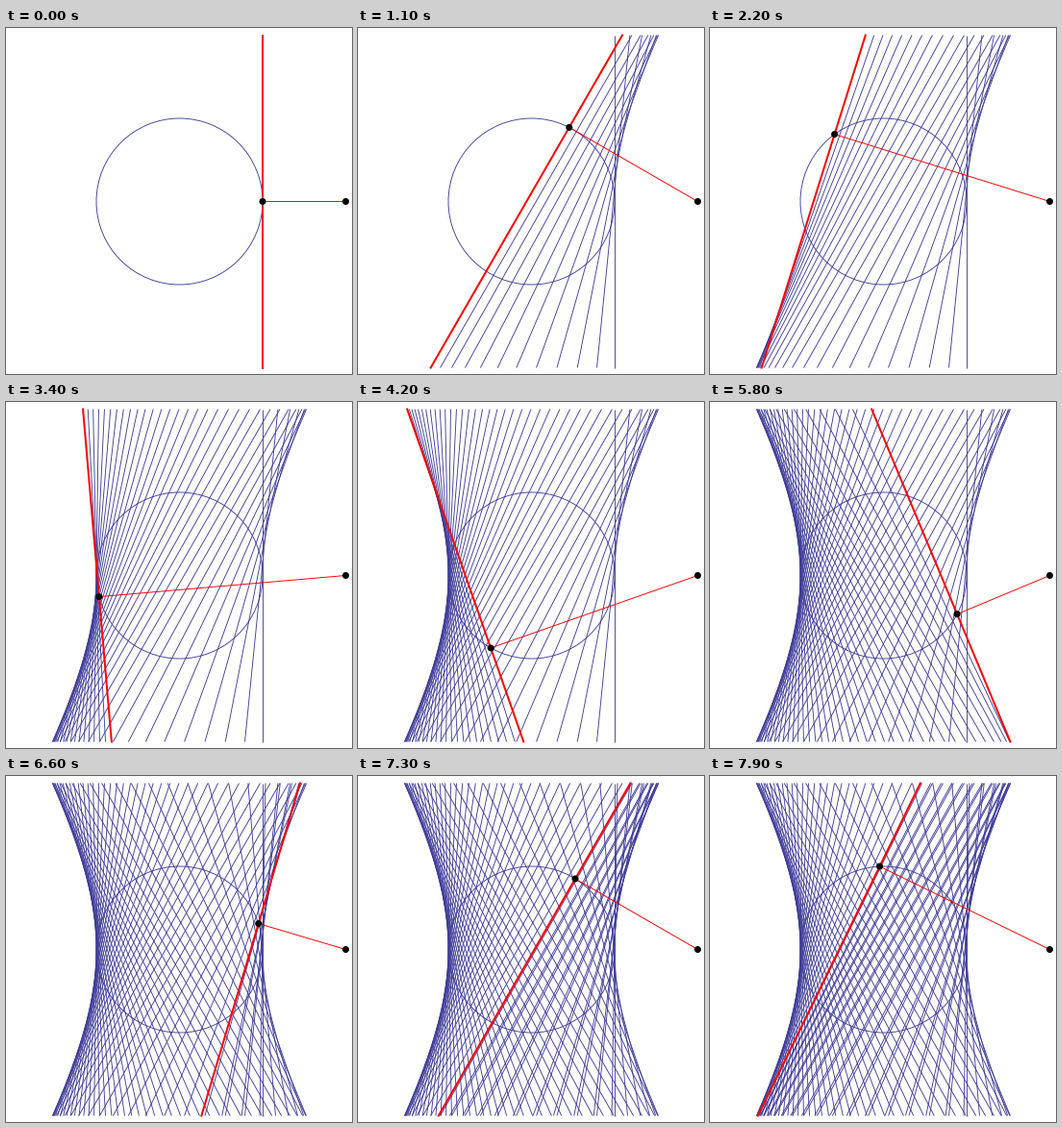
Write a matplotlib script that moves like this. It is 360x360 px and loops after 8000 ms.

```python
import numpy as np
import matplotlib.pyplot as plt
from matplotlib.animation import FuncAnimation
from matplotlib.collections import LineCollection
from matplotlib.patches import Circle

SIZE, DPI = 360, 72          # at 72 dpi one point is one pixel
FRAMES, INTERVAL = 80, 100
STEP = 0.1                   # radians per frame
CENTER, R = 180.5, 86.5
BLUE, RED = "#3f3d99", "#ff0000"


def to_px(x, y):
    """Unit-circle coordinates to stage pixels, y pointing down."""
    return CENTER + R * x, CENTER - R * y


def pedal_line(a):
    """Line through the circle point, perpendicular to its ray to the focus (2, 0)."""
    c, s = np.cos(a), np.sin(a)
    return [to_px(c + s * (y - s) / (2 - c), y) for y in (2, -2)]


fig = plt.figure(figsize=(SIZE / DPI, SIZE / DPI), dpi=DPI, facecolor="white")
ax = fig.add_axes([0, 0, 1, 1])
ax.set_xlim(0, SIZE)
ax.set_ylim(SIZE, 0)
ax.axis("off")

focus = to_px(2, 0)
lines = [pedal_line(STEP * k) for k in range(FRAMES)]

ax.add_patch(Circle((CENTER, CENTER), R, fill=False, ec=BLUE, lw=0.9, zorder=1))
trail = LineCollection([], colors=BLUE, linewidths=0.9, zorder=2)
ax.add_collection(trail, autolim=False)
tangent, = ax.plot([], [], color=RED, lw=2, solid_capstyle="projecting", zorder=3)
ray, = ax.plot([], [], color=RED, lw=0.95, snap=False, zorder=4)
dots = [ax.add_patch(Circle(focus, 3.5, fc="black", lw=0, zorder=5))
        for _ in range(2)]


def update(k):
    a = STEP * k
    p = to_px(np.cos(a), np.sin(a))
    trail.set_segments(lines[:k])
    tangent.set_data(*zip(*lines[k]))
    ray.set_data(*zip(p, focus))
    dots[0].center = p
    return trail, tangent, ray, dots[0]


anim = FuncAnimation(fig, update, frames=FRAMES, interval=INTERVAL,
                     init_func=lambda: update(0), repeat=True, repeat_delay=0)
plt.show()
```
